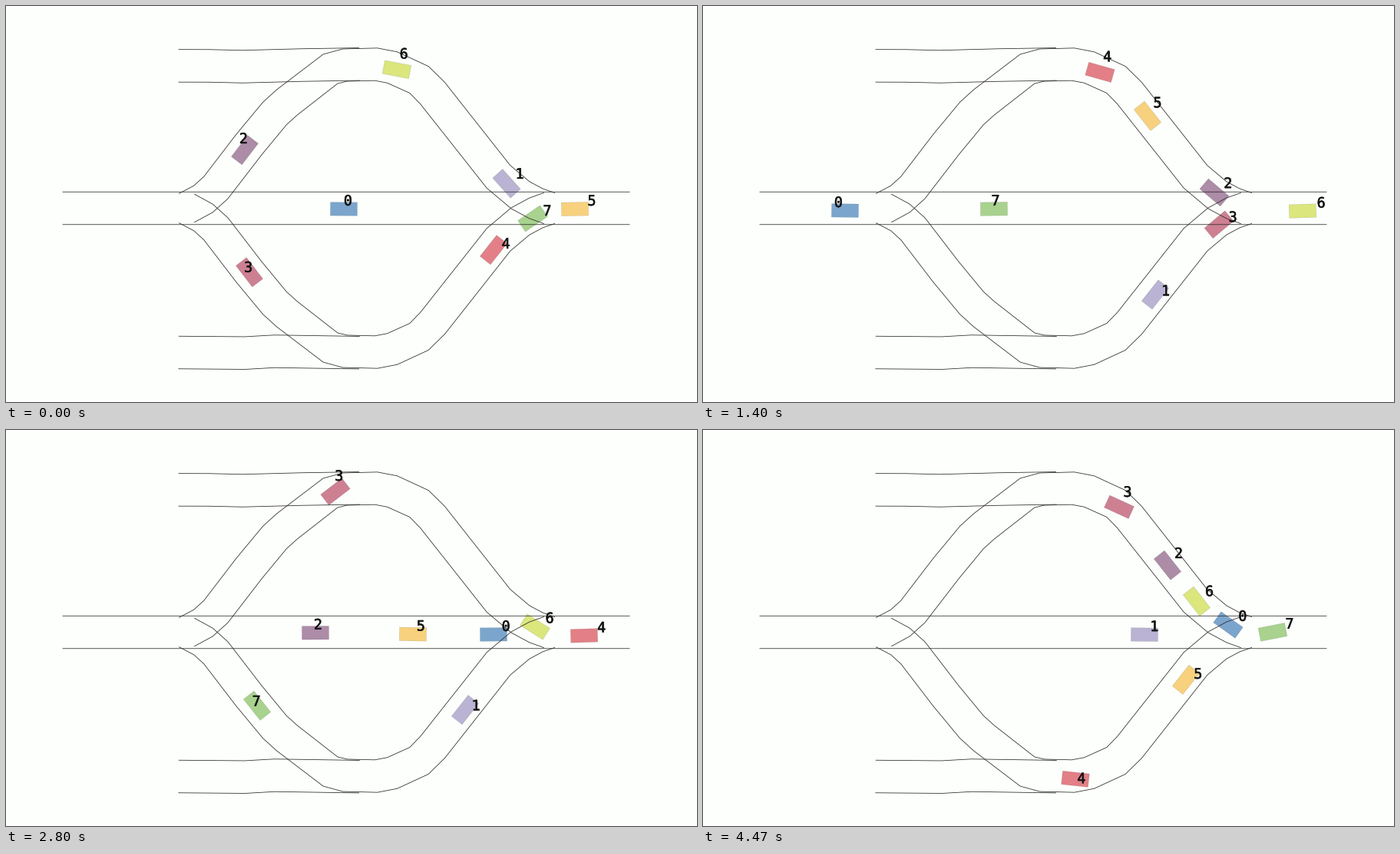
A matplotlib script for the animation above (4.54 s loop, 900 px wide and 516 px high).

```python
import matplotlib.pyplot as plt
import numpy as np
from matplotlib.animation import FuncAnimation
from matplotlib.patches import Polygon
from matplotlib.patheffects import withStroke

W, H, DPI = 900, 516, 100
PX = 72 / DPI
LOOP_MS, TICK_MS = 4540, 20
STEPS, STEPS_PER_MS = 68, 0.015

MIDDLE = 263.5           # the lower road mirrors the upper one about this line
HALF_ROAD = 21.25
CAR_L, CAR_W = 35, 17.5
SPEED = 21               # cruising pixels per step
HEADING_LAG = 18         # a car's heading trails the road by this length
ENTRY_X, EXIT_X = 130, 792

# Centre lines
UPPER = np.array([(235.5, 263), (257, 251.5), (273.5, 236.5), (316.5, 180.5),
                  (350, 140), (366, 125.5), (422.5, 82), (441.5, 77), (482, 76),
                  (503, 80), (538, 96), (555.5, 113.5), (641.5, 222.5),
                  (670, 246.5), (690.5, 257.5), (707.5, 263.5)])
MAIN = [(74, MIDDLE), (812, MIDDLE)]
TOP_STUB = [(225, 77.9), (265, 78), (308, 79), (385, 77), (460, 75.8)]
LOW_STUB = [(225, 451.5), (311, 452.2), (350, 450), (460, 451.7)]

# Each car: colour, road (Main, Upper, Lower) and x at the key steps
KEY_STEPS = (0, 15, 21, 32, 42, 58, 67)
CARS = [
    ("#7ba5cc", "MMMMMUU", (440, 712, 185, 423, 635, 633, 684)),
    ("#bab3d3", "ULLLLMM", (652, 483, 589, 791, 598, 637, 575)),
    ("#ac8ca7", "UUUMMMU", (311, 590, 666, 185, 403, 742, 605)),
    ("#cd8092", "LLLUUUU", (317, 578, 672, 268, 429, 686, 542)),
    ("#e27f87", "LUUUULL", (635, 383, 517, 666, 753, 322, 485)),
    ("#f7d17d", "MUUUMLL", (741, 778, 579, 725, 530, 473, 629)),
    ("#dbe67d", "UUUUUUU", (509, 657, 781, 544, 689, 596, 643)),
    ("#a8d28e", "LMMMLLL", (686, 252, 379, 625, 327, 600, 742)),
]


def unit(v):
    return v / np.linalg.norm(v, axis=1, keepdims=True)


def mirrored(points):
    return np.array(points) * (1, -1) + (0, 2 * MIDDLE)


def edges(points):
    """Both sides of a road, offset from its centre line."""
    p = np.array(points, float)
    d = unit(np.diff(p, axis=0))
    d = unit(np.vstack([d[:1], d[:-1] + d[1:], d[-1:]]))
    normal = d[:, ::-1] * (-1, 1)
    return p + HALF_ROAD * normal, p - HALF_ROAD * normal


class Route:
    """Driving line y(x), measured by its length."""

    def __init__(self, x, y):
        self.x, self.y = x, y
        self.s = np.concatenate([[0], np.cumsum(np.hypot(np.diff(x), np.diff(y)))])
        self.angle = np.arctan(np.gradient(y, x))

    def length_at(self, x):
        return np.interp(x, self.x, self.s)

    def pose(self, s):
        return (np.interp(s, self.s, self.x), np.interp(s, self.s, self.y),
                np.interp(s - HEADING_LAG, self.s, self.angle))


def smooth(y, size=17):
    padded = np.pad(y, size // 2, mode="edge")
    return np.convolve(padded, np.ones(size) / size, mode="valid")


def make_routes():
    x = np.arange(100.0, 840)
    # cars overshoot the merge a little, then settle
    points = np.vstack([[(100, 264.5), (220, 264.5)], UPPER,
                        [(728, 269.5), (760, 267.5), (840, 266)]])
    upper = smooth(np.interp(x, *points.T))
    drift = 5 * np.clip((x - 430) / 60, 0, 1)
    return {"M": Route(x, 265.5 + 1.2 * np.sin((x - 500) / 60)),
            "U": Route(x, upper),
            "L": Route(x, 2 * MIDDLE - upper + drift)}


def split_legs(roads, xs):
    """A car starts a new leg when it changes road or jumps back."""
    legs, last = [], (None, 0)
    for step, road, x in zip(KEY_STEPS, roads, xs):
        if road != last[0] or x < last[1]:
            legs.append((routes[road], []))
        legs[-1][1].append((step, routes[road].length_at(x)))
        last = road, x
    return legs


def drive(roads, xs):
    """Pose (x, y, angle) of one car at every step."""
    poses, start = [], 0
    for route, keys in split_legs(roads, xs):
        first, s0 = keys[0]
        last, s1 = keys[-1]
        left = route.length_at(EXIT_X) - s1
        end = last + max(1, int(np.ceil(left / SPEED)))
        if start < first:
            keys = [(start, s0 - SPEED * (first - start))] + keys
        steps, lengths = zip(*keys, (end, s1 + SPEED * (end - last)))
        poses += [route.pose(np.interp(n, steps, lengths)) for n in range(start, end)]
        start = end
    return poses


def car_corners(x, y, angle):
    c, s = np.cos(angle), np.sin(angle)
    box = np.array([(-1, -1), (1, -1), (1, 1), (-1, 1)]) * (CAR_L / 2, CAR_W / 2)
    return box @ np.array([[c, s], [-s, c]]) + (x, y)


def label_spot(x, y):
    # labels drift away from their cars across the stage
    return 1.055 * x - 18.8, 1.053 * y - 18.7


fig = plt.figure(figsize=(W / DPI, H / DPI), dpi=DPI, facecolor="#fdfffc")
ax = fig.add_axes([0, 0, 1, 1])
ax.set_xlim(0, W)
ax.set_ylim(H, 0)
ax.axis("off")

for road in (MAIN, TOP_STUB, LOW_STUB, UPPER, mirrored(UPPER)):
    for side in edges(road):
        ax.plot(*side.T, color="#2c2c2c", lw=0.8 * PX, snap=False, zorder=2)

routes = make_routes()
tracks = [drive(roads, xs) for _, roads, xs in CARS]
bodies, labels = [], []
for n, (color, _, _) in enumerate(CARS):
    body = Polygon(np.zeros((4, 2)), fc=color, ec=(0.3, 0.3, 0.3, 0.25),
                   lw=0.5 * PX, snap=False, zorder=1)
    bodies.append(ax.add_patch(body))
    labels.append(ax.text(0, 0, str(n), family="DejaVu Sans Mono", size=18.5 * PX,
                          color="#141414", ha="center", va="baseline", zorder=3,
                          path_effects=[withStroke(linewidth=0.6 * PX,
                                                   foreground="#141414")]))


def update(tick):
    step = min(int((tick * TICK_MS + 14) * STEPS_PER_MS), STEPS - 1)
    for track, body, label in zip(tracks, bodies, labels):
        x, y, angle = track[step]
        body.set_xy(car_corners(x, y, angle))
        label.set_position(label_spot(x, y))
        for part in (body, label):
            part.set_visible(x >= ENTRY_X)
    return bodies + labels


anim = FuncAnimation(fig, update, frames=LOOP_MS // TICK_MS, interval=TICK_MS,
                     repeat=True, repeat_delay=0, blit=False)
plt.show()
```
